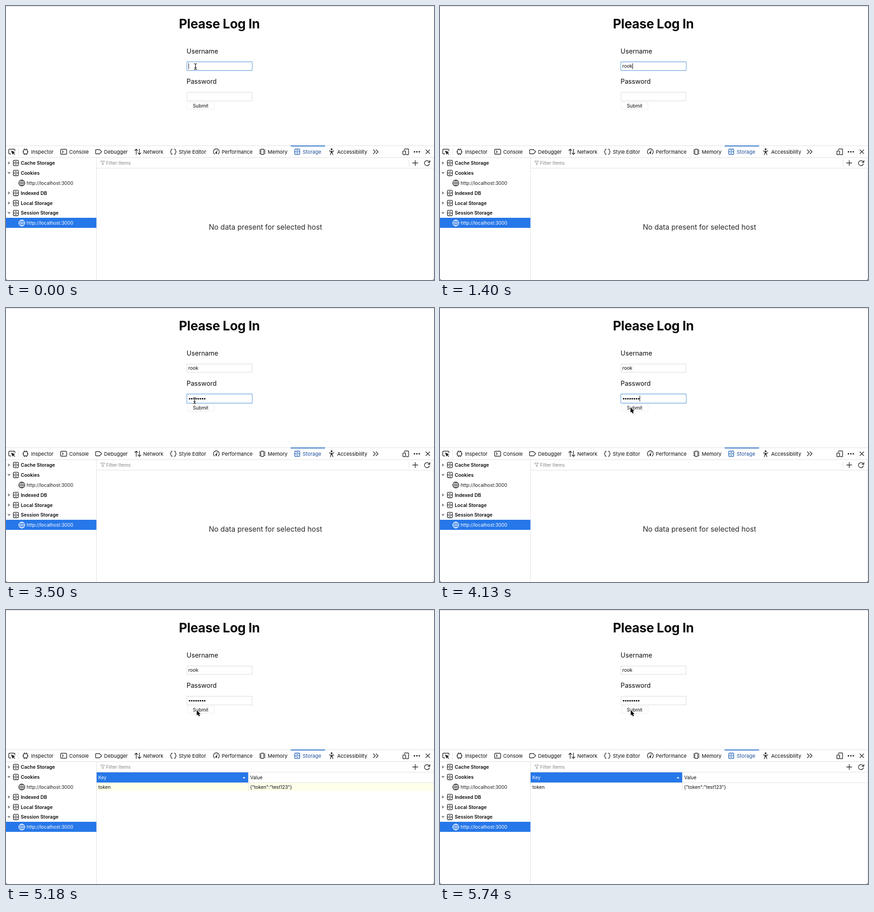
These frames come from a looping animation (935x599 px, 5810 ms). An HTML page:

```html
<!DOCTYPE html>
<html lang="en">
<head>
<meta charset="utf-8">
<title>Log in and session storage</title>
<style>
html, body { margin: 0; width: 100%; height: 100%; overflow: hidden; background: #fff; }
svg { display: block; width: 935px; height: 599px; font-family: Inter, "Open Sans", sans-serif; }
text { fill: #0c0c0d; white-space: pre; }
.tab text { font-size: 11px; }
.small text { font-size: 10.2px; }
.tree text { font-size: 10.5px; }
.bold { font-weight: 600; }
.icon { fill: none; stroke: #2a2a2e; stroke-width: 1.4; stroke-linecap: round; stroke-linejoin: round; }
.rule { fill: none; stroke: #e0e0e2; }
</style>
</head>
<body>
<svg viewBox="0 0 935 599">
  <defs>
    <linearGradient id="pressed" x2="0" y2="1">
      <stop stop-color="#4b95f8"/><stop offset="1" stop-color="#1865ec"/>
    </linearGradient>
    <g id="store">
      <rect x="-5.4" y="-5.9" width="10.8" height="11.8" rx="1.8"/>
      <path d="M-5.4 0H5.4M-1.3 -2.9H1.3M-1.3 3H1.3"/>
    </g>
    <g id="globe">
      <circle r="6.5"/>
      <g stroke-width=".9"><ellipse rx="3.1" ry="6.5"/><path d="M-6.5 0H6.5M0 -6.5V6.5"/></g>
    </g>
    <path id="beamPath" d="M-3 -6Q0 -6 0 -4Q0 -6 3 -6M0 -4V4.5M-3 6.5Q0 6.5 0 4.5Q0 6.5 3 6.5M-2 2.5H2"/>
  </defs>

  <rect width="935" height="599" fill="#fff"/>
  <path d="M0 .5H935" stroke="#d0d0d0"/>

  <!-- Login page -->
  <text x="466.1" y="48.6" text-anchor="middle" font-size="28" font-weight="700" letter-spacing="-.3">Please Log In</text>
  <g font-size="14.2">
    <text x="394.6" y="103.5">Username</text>
    <text x="394.6" y="169.7">Password</text>
  </g>
  <rect id="nameBox" fill="#fff"/>
  <rect id="passBox" fill="#fff"/>
  <text id="login" x="398.2" y="135.4" font-size="10.4"></text>
  <g id="dots"></g>
  <path id="caret" stroke="#000" d="M0 -6.3V6.3"/>
  <rect id="button" y="211" height="14.7" rx="2"/>
  <text x="425.2" y="221.7" text-anchor="middle" font-size="10.3">Submit</text>

  <!-- Toolbar -->
  <path class="rule" d="M0 305.5H935M0 331.5H935M198 354.5H935M197.5 332V599M27.5 311V327"/>
  <path d="M622 306H697" stroke="#2f74c8" stroke-width="2"/>
  <g class="tab" id="tabs"></g>
  <g class="icon">
    <path d="M19.5 316.5V315a2 2 0 0 0-2-2H8a2 2 0 0 0-2 2v6.5a2 2 0 0 0 2 2h2.500"/>
    <path d="M12 317l6.500 2.800-2.700 1.200-1.200 2.700zM16 321.200l3 3.200" fill="#2a2a2e"/>
    <rect x="38" y="314.2" width="9" height="9" rx="1.5"/>
    <path d="M40.500 314V312M44.500 314V312M40.500 323.500V325.200M44.500 323.500V325.200M37.800 318.700H36.500M47.200 318.700H48.500"/>
    <rect x="119.3" y="313.2" width="13.2" height="10.8" rx="1.8"/>
    <path d="M122.800 316.300l2.400 2.300-2.400 2.300"/>
    <path d="M197 314h7.300l4.800 4.600-4.800 4.600H197a1.300 1.300 0 0 1-1.300-1.300v-6.600a1.300 1.300 0 0 1 1.300-1.300z"/>
    <path d="M284.500 324.500V313M281.300 316l3.200-3.200 3.200 3.200M291.500 312.800V324.300M288.300 321.300l3.200 3.200 3.200-3.200"/>
    <path d="M363 313c-4 0-1.300 5-4 5.600 2.700.6 0 5.600 4 5.600M368 313c4 0 1.300 5 4 5.600-2.700.6 0 5.600-4 5.600"/>
    <path d="M455.500 323.700a6.400 6.400 0 1 1 8 0M459.500 320.500l1.800-4.500"/>
    <circle cx="459.3" cy="321" r="1.3" fill="#2a2a2e"/>
    <rect x="556.5" y="313" width="7" height="11.5" rx="1.5"/>
    <path d="M556 315.200H553.600M556 318.700H553.600M556 322.200H553.600M564 315.200H566.400M564 318.700H566.400M564 322.200H566.400" stroke-width="1.2"/>
    <use href="#store" x="636.2" y="318.6" stroke="#2463b8"/>
    <circle cx="711.3" cy="313.3" r="1.3" fill="#2a2a2e"/>
    <path d="M706.300 316.700l3.500.9h3l3.500-.9M710 318v3l-1.500 4.200M712.600 318v3l1.500 4.200M711.300 318v2.500"/>
    <path d="M802.500 314.300l4.300 4.400-4.300 4.400M808.500 314.300l4.300 4.400-4.300 4.400"/>
    <path d="M870.500 314.500V313.500a1 1 0 0 1 1-1h7a1 1 0 0 1 1 1v10.500a1 1 0 0 1-1 1h-4"/>
    <rect x="867" y="317" width="6" height="8" rx="1"/>
    <path d="M917.300 314.500l8.300 8.300M925.600 314.500l-8.300 8.300"/>
    <path d="M888.300 343.300H899.700M894 337.600V349"/>
    <path d="M925 345a5.500 5.500 0 1 1-1.300-5.300l1.800 1.800M926 337.600V341.700H922"/>
    <path d="M207 339h8.500l-3.200 4.200v4l-2-1.200v-2.800z" stroke="#8f8f94" stroke-width="1"/>
  </g>
  <g fill="#2a2a2e">
    <circle cx="892.3" cy="318.7" r="1.7"/><circle cx="897.6" cy="318.7" r="1.7"/><circle cx="902.9" cy="318.7" r="1.7"/>
  </g>
  <path id="divider" class="rule" d="M880.5 336V351"/>

  <!-- Storage panel -->
  <rect y="463" width="197.5" height="22" fill="#2677e9"/>
  <g class="tree" id="tree"></g>
  <text x="218.5" y="347" font-size="10.3" style="fill:#85858a">Filter Items</text>
  <text id="empty" x="566.8" y="489" text-anchor="middle" font-size="15.7" style="fill:#2a2a2e">No data present for selected host</text>
  <g id="table" class="small">
    <rect x="198" y="355" width="331" height="22" fill="#2677e9"/>
    <rect id="row" x="198" y="378" width="737" height="17.5"/>
    <path class="rule" d="M198 377.5H935M529.5 355V395.5"/>
    <path d="M517 368l3-3.600 3 3.600z" fill="#fff"/>
    <text x="201.5" y="369.7" style="fill:#fff">Key</text>
    <text x="533.5" y="369.7">Value</text>
    <text x="201.8" y="390.7">token</text>
    <text x="533" y="390.7">{"token":"test123"}</text>
  </g>
  <path class="rule" d="M934.5 332V599"/>
  <path d="M0 596v3h3q-2.500-.5-3-3zM935 596v3h-3q2.500-.5 3-3z" fill="#555"/>

  <!-- Pointer -->
  <circle id="ring" cx="416.5" cy="220" r="19.6" fill="none" stroke="#111" stroke-width="1.5"/>
  <g id="beam" fill="none" stroke-linecap="round">
    <use href="#beamPath" stroke="#fff" stroke-width="2.8"/>
    <use href="#beamPath" stroke="#000" stroke-width="1.2"/>
  </g>
  <path id="arrow" d="M0 0V11.600L2.700 9.200L4.600 13.500L6.700 12.600L4.900 8.400H8.300Z" stroke="#fff" stroke-width="1.2" paint-order="stroke"/>
</svg>
<script>
const LOOP = 5810, STEP = 70;
const LOGIN = "rook";
const LOGIN_KEYS = [490, 700, 910, 1050];
const PASS_KEYS = [1820, 1960, 2100, 2170, 2380, 2520, 2660, 2800];
const TAB = 1540, WAKE = 2870, PRESS = 4480, RELEASE = 4830, STORED = 5110;
const BLINK = 500, DOT_GAP = 4.7;

const $ = id => document.getElementById(id);
const set = (el, attrs) => { for (const k in attrs) el.setAttribute(k, attrs[k]); return el; };
const show = (id, on) => $(id).style.display = on ? "" : "none";
const clamp = p => Math.min(1, Math.max(0, p));
const add = (parent, tag, attrs, label = "") => {
  const el = set(document.createElementNS("http://www.w3.org/2000/svg", tag), attrs);
  el.textContent = label;
  return parent.appendChild(el);
};

const tabs = { Inspector: 54.8, Console: 138, Debugger: 214.3, Network: 299.7, "Style Editor": 377.5,
  Performance: 471.3, Memory: 571.8, Storage: 648, Accessibility: 723.5 };
for (const name in tabs) {
  add($("tabs"), "text", { x: tabs[name], y: 322.7, style: name === "Storage" ? "fill:#1f4f9c" : "" }, name);
}

const HOST = "http://localhost:3000";
["Cache Storage", "Cookies", HOST, "Indexed DB", "Local Storage", "Session Storage", HOST].forEach((name, i) => {
  const y = 343.2 + i * 21.88, host = name === HOST, picked = i === 6;
  const open = name === "Cookies" || name === "Session Storage";
  if (!host) add($("tree"), "path", {
    d: open ? "M-3.5 -2H3.5L0 2.5Z" : "M-2 -3.5V3.5L2.8 0Z",
    fill: "#85858a", transform: `translate(6.5 ${y})`
  });
  add($("tree"), "use", {
    href: host ? "#globe" : "#store", class: "icon", x: host ? 34.5 : 21.6, y,
    style: `stroke-width:1.3;stroke:${picked ? "#fff" : "#1c1c1f"}`
  });
  add($("tree"), "text", {
    x: host ? 45 : 32.2, y: y + 3.8, class: host ? "" : "bold",
    style: host ? `font-size:10.25px;fill:${picked ? "#fff" : "#1c1c1f"}` : ""
  }, name);
});

const dots = PASS_KEYS.map((_, i) => add($("dots"), "circle", { cx: 401.1 + i * DOT_GAP, cy: 198.4, r: 1.65 }));

function drawField(id, y, height, focused) {
  set($(id), focused
    ? { x: 395, y: y - .5, width: 143, height: height + 1, rx: 1, stroke: "#9dc2e8", "stroke-width": 1.8 }
    : { x: 395.5, y, width: 142, height, rx: 0, stroke: "#dadada", "stroke-width": 1 });
}

const glide = (t, from, to) => {
  const p = clamp((t - from) / (to - from));
  return p * p * (3 - 2 * p);
};

function draw(t) {
  const typed = LOGIN_KEYS.filter(k => t >= k).length;
  const hidden = PASS_KEYS.filter(k => t >= k).length;
  const onName = t < TAB, onPass = !onName && t < PRESS;

  drawField("nameBox", 122.5, 18, onName);
  drawField("passBox", 188.5, 19, onPass);
  $("login").textContent = LOGIN.slice(0, typed);
  dots.forEach((dot, i) => dot.style.display = i < hidden ? "" : "none");

  const last = Math.max(0, ...[...LOGIN_KEYS, TAB, ...PASS_KEYS].filter(k => t >= k));
  show("caret", t < PRESS && Math.floor((t - last) / BLINK) % 2 === 0);
  const caretX = 399 + (onName ? $("login").getComputedTextLength() : hidden * DOT_GAP);
  set($("caret"), { transform: `translate(${caretX} ${onName ? 131.5 : 198})` });

  const down = t >= PRESS && t < RELEASE;
  set($("button"), down
    ? { x: 398, width: 56.5, fill: "url(#pressed)", stroke: "none" }
    : { x: 396, width: 58.5, fill: "#fff", stroke: "#ececec" });
  show("ring", down);

  const a = glide(t, WAKE + STEP, 3430), b = glide(t, 3850, 4200);
  const x = 414 - 2 * a + 4.7 * b, y = 132 + 70 * a + 17 * b;
  const awake = t < LOGIN_KEYS[0] || t >= WAKE, overButton = y > 209;
  show("beam", awake && !overButton);
  show("arrow", awake && overButton);
  set($(overButton ? "arrow" : "beam"), { transform: `translate(${x} ${y})` });

  const stored = t >= STORED;
  show("empty", !stored);
  show("divider", !stored);
  show("table", stored);
  const fade = clamp((t - STORED - STEP) / 420);
  set($("row"), { fill: `rgb(255,255,${Math.round(234 + 21 * fade)})` });
}

const start = performance.now();
function tick() {
  const t = Math.max(0, performance.now() - start) % LOOP;
  draw(Math.floor(t / STEP) * STEP);
  requestAnimationFrame(tick);
}
draw(0);
requestAnimationFrame(tick);
</script>
</body>
</html>
```
